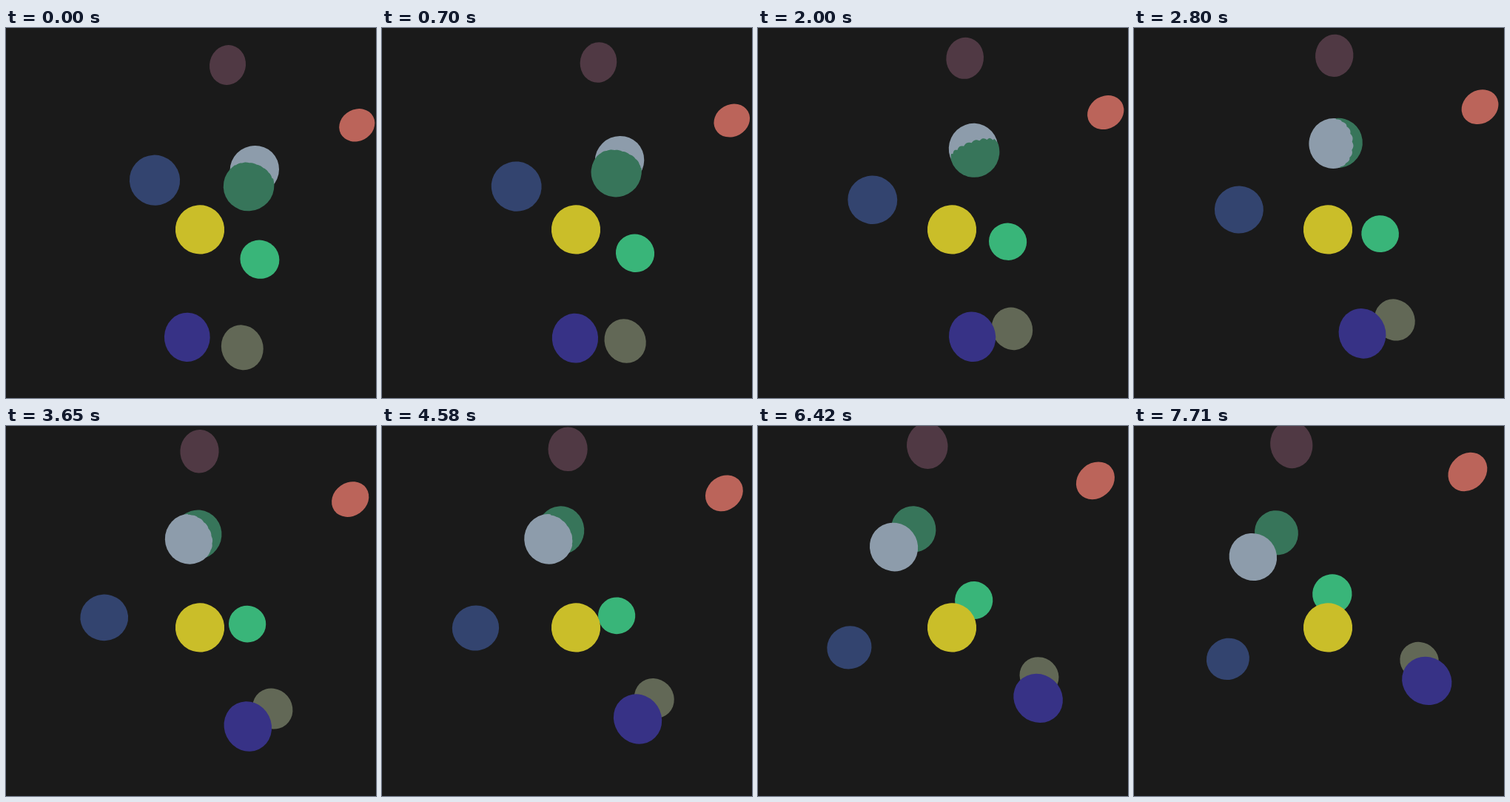
Recreate the animation shown at these times as an HTML page with a canvas. Size 500 by 500 pixels, loop 7810 ms.

```html
<!DOCTYPE html>
<html lang="en">
<head>
<meta charset="utf-8">
<title>Orbiting spheres</title>
<style>
  html, body { margin: 0; width: 100%; height: 100%; overflow: hidden; background: #1a1a1a; }
  canvas { display: block; width: 500px; height: 500px; }
</style>
</head>
<body>
<canvas id="stage" width="500" height="500"></canvas>
<script>
const ctx = document.getElementById('stage').getContext('2d');
const LOOP = 7810;
const SPAN = 7710;        // the last pose is held until the loop restarts
const STEP = LOOP / 130;  // time between pictures
const TICK = 10;          // time step of the simulation
const CENTER = 250;
const FOCAL = 433;        // 60 degree field of view
const SIZE = 29.3;        // planet radius
const GRAVITY = 60000;

const sun = { color: '#cabe29', size: 33.1, at: [12, 22.4, FOCAL] };

// Each planet is given by its first and last look on screen: x, y, radius.
const mauve = planet('#503944', [299.5, 50, 24.4], [212.5, 25, 28.5]);
const red = planet('#bb645a', [474.3, 131.3, 21.4], [450.8, 61.8, 24]);
const blue = planet('#33446f', [201, 205.7, 33.9], [127, 315.1, 27.9]);
const grey = planet('#8d9cab', [335.8, 191.8, 32.6], [160.5, 177.2, 31.6]);
const pine = planet('#37755a', [328.1, 213.4, 33.8], [192.2, 144.4, 29.2]);
const mint = planet('#39b579', [342.9, 312.7, 25.9], [267.4, 227, 26.7]);
const olive = planet('#626856', [319.3, 431.8, 28.1], [385.7, 316.8, 25.05]);
const navy = planet('#373286', [244.8, 417.8, 30.9], [396, 344, 31.9]);

// Place in space of a planet seen at x, y with the given radius.
function unproject([x, y, radius]) {
  return [x - CENTER, y - CENTER, FOCAL].map(c => c * SIZE / radius);
}

// Path of a body pulled by the sun.
function orbit(start, velocity) {
  let p = start, v = velocity;
  const path = [p];
  for (let t = 0; t < SPAN; t += TICK) {
    const d = p.map((c, i) => sun.at[i] - c);
    const pull = GRAVITY / Math.hypot(...d) ** 3;
    v = v.map((c, i) => c + d[i] * pull * TICK / 1000);
    p = p.map((c, i) => c + v[i] * TICK / 1000);
    path.push(p);
  }
  return path;
}

// Corrects the starting velocity until the orbit ends in the right place.
function planet(color, first, last) {
  const start = unproject(first), end = unproject(last);
  let v = end.map((c, i) => (c - start[i]) / SPAN * 1000);
  let path = orbit(start, v);
  for (let n = 0; n < 40; n++) {
    const stop = path[path.length - 1];
    v = v.map((c, i) => c + 0.5 * (end[i] - stop[i]) / SPAN * 1000);
    path = orbit(start, v);
  }
  return { color, size: SIZE, path };
}

function project(body, t) {
  const [x, y, z] = body.path ? body.path[Math.round(t / TICK)] : body.at;
  const zoom = FOCAL / z;
  return {
    color: body.color, zoom,
    x: CENTER + x * zoom, y: CENTER + y * zoom, r: body.size * zoom,
    far: Math.hypot(x, y, z)
  };
}

// Perspective stretches a sphere away from the middle of the view.
function drawSphere(p) {
  const dx = p.x - CENTER, dy = p.y - CENTER;
  const stretch = Math.hypot(1, Math.hypot(dx, dy) / FOCAL);
  ctx.fillStyle = p.color;
  ctx.beginPath();
  ctx.ellipse(p.x, p.y, p.r * stretch, p.r, Math.atan2(dy, dx), 0, 2 * Math.PI);
  ctx.fill();
}

// Two spheres that may pass through each other.
function drawPair(back, front) {
  drawSphere(back);
  const dx = back.x - front.x, dy = back.y - front.y;
  const depth = (back.far - front.far) * front.zoom;
  const flat = Math.hypot(dx, dy);
  const dist = Math.hypot(flat, depth);
  const r = (back.r + front.r) / 2;
  const edge = dist * dist / 2 / flat; // where the cut meets the outline
  if (edge >= r) return drawSphere(front);

  const angle = Math.atan2(dy, dx);
  ctx.save();
  ctx.translate(front.x, front.y);
  ctx.rotate(angle);
  ctx.beginPath();
  ctx.rect(-100, -100, 100 + edge, 200);
  // Rim of the cut, scalloped by the facets when the centres are close.
  const rim = Math.sqrt(r * r - dist * dist / 4);
  const bump = 14 / Math.max(dist, 6);
  for (let i = 0; i <= 180; i++) {
    const a = i * Math.PI / 90;
    const u = flat / 2 + rim * depth / dist * Math.cos(a) + bump * (Math.abs(Math.sin(9 * a)) - 0.5);
    const v = rim * Math.sin(a);
    if (i) ctx.lineTo(u, v); else ctx.moveTo(u, v);
  }
  ctx.closePath();
  ctx.rotate(-angle);
  ctx.translate(-front.x, -front.y);
  ctx.clip();
  drawSphere(front);
  ctx.restore();
}

const farFirst = (a, b) => b.far - a.far;

function draw(t) {
  const look = body => project(body, t);
  ctx.fillStyle = '#1a1a1a';
  ctx.fillRect(0, 0, 500, 500);
  drawPair(...[grey, pine].map(look).sort(farFirst));
  [sun, mauve, red, blue, mint, olive, navy].map(look).sort(farFirst).forEach(drawSphere);
}

function tick() {
  const t = performance.now() % LOOP;
  draw(Math.min(Math.round(t / STEP) * STEP, SPAN));
  requestAnimationFrame(tick);
}
tick();
</script>
</body>
</html>
```
